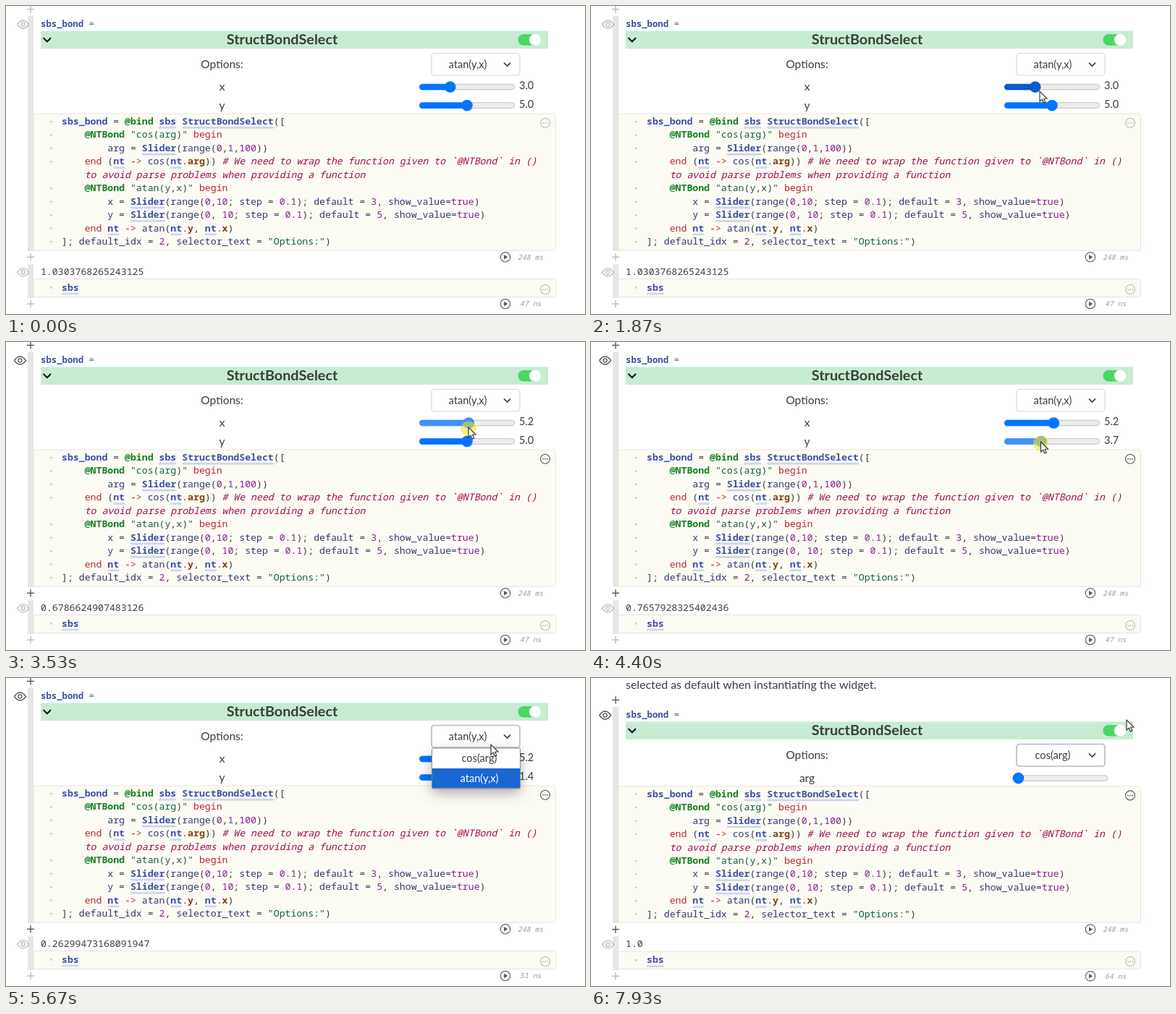
Write an HTML page with a canvas that moves like this. It is 800x426 px and loops after 8000 ms.

```html
<!DOCTYPE html>
<html lang="en">
<head>
<meta charset="utf-8">
<title>StructBondSelect</title>
<style>
html, body { margin: 0; width: 100%; height: 100%; overflow: hidden; background: #fff; }
canvas { display: block; width: 800px; height: 426px; }
</style>
</head>
<body>
<canvas id="stage" width="800" height="426"></canvas>
<script>
const ctx = document.getElementById('stage').getContext('2d');
const LOOP = 8000, LAG = 150;
const MONO = '"Noto Sans Mono", "DejaVu Sans Mono", monospace';
const SANS = 'Lato, "Open Sans", sans-serif';
const INK = '#3b3b44', BLUE = '#3d4ea6', NAVY = '#31396f';

const CODE = [
  'sbs_bond = @bind sbs StructBondSelect([',
  '    @NTBond "cos(arg)" begin',
  '        arg = Slider(range(0,1,100))',
  '    end (nt -> cos(nt.arg)) # We need to wrap the function given to `@NTBond` in ()',
  '    #to avoid parse problems when providing a function',
  '    @NTBond "atan(y,x)" begin',
  '        x = Slider(range(0,10; step = 0.1); default = 3, show_value=true)',
  '        y = Slider(range(0, 10; step = 0.1); default = 5, show_value=true)',
  '    end nt -> atan(nt.y, nt.x)',
  ']; default_idx = 2, selector_text = "Options:")'
];
const WRAPPED = 4;
const TOKEN = /#.*|"[^"]*"|@\w+|\.[a-z]\w*|\d+(\.\d+)?|\w+|->|[^\w\s]/g;
const LINKED = ['sbs', 'StructBondSelect', 'Slider', 'nt'];

// time, x, y of the pointer tip
const PATH = [
  [1330, 636, 146], [1600, 620, 118], [2300, 620, 118], [2850, 664, 118],
  [3000, 676, 118], [3090, 681, 118], [3500, 639, 118], [3680, 639, 118],
  [4080, 637, 138], [4250, 637, 138], [4400, 621.6, 138], [4750, 595, 138],
  [4960, 595, 138], [5330, 655, 80], [5460, 669, 91], [5670, 670, 92],
  [6270, 670, 93], [6450, 670, 103], [6600, 669, 100], [7130, 669, 100],
  [7650, 740, 58]
];
const PRESS = [[2250, 3540], [4150, 4900], [5460, 5560], [6540, 6620]];
const OPEN = [5520, 6600], SWITCH = 6740;

const within = (t, [a, b]) => t >= a && t < b;
const clamp = v => Math.max(0, Math.min(1, v));

function pointer(t) {
  if (t < PATH[0][0]) return null;
  for (let i = 1; i < PATH.length; i++) {
    const [t0, x0, y0] = PATH[i - 1], [t1, x1, y1] = PATH[i];
    if (t <= t1) {
      const k = (t - t0) / (t1 - t0);
      return { x: x0 + (x1 - x0) * k, y: y0 + (y1 - y0) * k };
    }
  }
  const [, x, y] = PATH[PATH.length - 1];
  return { x, y };
}

function dragged(t, span, start) {
  if (t < span[0]) return start;
  const p = pointer(Math.min(t, span[1] - 1));
  return Math.round((p.x - 579) / 1.16) / 10;
}
const xAt = t => t < 2300 ? 3 : dragged(t, PRESS[0], 3);
const yAt = t => dragged(t, PRESS[1], 5);

function text(s, x, y, font, color = INK, align = 'left') {
  ctx.font = font;
  ctx.fillStyle = color;
  ctx.textAlign = align;
  ctx.fillText(s, x, y);
}
const mono = (size, weight = 400, style = '') => `${style} ${weight} ${size}px ${MONO}`;
const sans = (size, weight = 400) => `${weight} ${size}px ${SANS}`;

function box(x, y, w, h, r, fill, stroke, width = 1) {
  ctx.beginPath();
  ctx.roundRect(x, y, w, h, r);
  if (fill) { ctx.fillStyle = fill; ctx.fill(); }
  if (stroke) { ctx.strokeStyle = stroke; ctx.lineWidth = width; ctx.stroke(); }
}

function disc(x, y, r, fill, stroke, width = 1) {
  box(x - r, y - r, 2 * r, 2 * r, r, fill, stroke, width);
}

function line(points, color, width) {
  ctx.beginPath();
  points.forEach(([x, y]) => ctx.lineTo(x, y));
  ctx.strokeStyle = color;
  ctx.lineWidth = width;
  ctx.stroke();
}

function gray(k) {
  const v = Math.round(186 - 100 * k);
  return `rgb(${v},${v},${v})`;
}

function plus(x, y, k) {
  line([[x - 5, y], [x + 5, y]], gray(k), 1.4);
  line([[x, y - 5], [x, y + 5]], gray(k), 1.4);
}

function eye(y, k) {
  const x = 23.5 - 4 * k, c = gray(k);
  ctx.beginPath();
  ctx.moveTo(x - 8, y);
  ctx.quadraticCurveTo(x, y - 11, x + 8, y);
  ctx.quadraticCurveTo(x, y + 11, x - 8, y);
  ctx.strokeStyle = c;
  ctx.lineWidth = 1.3;
  ctx.stroke();
  disc(x, y, 2.6, null, c, 1.3);
}

function menuDots(y, k) {
  disc(745, y, 6.5, null, gray(k), 1.1);
  [-3, 0, 3].forEach(d => disc(745 + d, y, 0.9, gray(k)));
}

function runInfo(y, label, x) {
  disc(690, y, 6.7, null, '#666', 1.2);
  ctx.beginPath();
  ctx.moveTo(688, y - 3.2);
  ctx.lineTo(693.2, y);
  ctx.lineTo(688, y + 3.2);
  ctx.fillStyle = '#555';
  ctx.fill();
  text(label, x, y + 3.2, mono(9.8, 400, 'italic'), '#999');
}

function style(tok) {
  if (tok[0] === '#') return ['#a00d50', 500, 'italic'];
  if (tok[0] === '"') return ['#125c40', 500];
  if (tok[0] === '@') return ['#12801a', 700];
  if (tok[0] === '.') return ['#7c4312', 600];
  if (/^(begin|end|->)$/.test(tok)) return ['#b8252c', 500];
  if (/^(\d|true)/.test(tok)) return ['#84208f', 500];
  if (tok === 'sbs_bond' || LINKED.includes(tok)) return [BLUE, 600];
  if (/^\w/.test(tok)) return [NAVY, 500];
  return [INK, 500];
}

function codeLine(src, x, base) {
  ctx.font = mono(13.2);
  const step = ctx.measureText('0').width;
  for (const m of src.matchAll(TOKEN)) {
    let tok = m[0], at = x + m.index * step;
    const [color, weight, slant] = style(tok);
    if (LINKED.includes(tok)) {
      ctx.fillStyle = '#cfd4ee';
      ctx.fillRect(at, base + 3, tok.length * step, 2.6);
    }
    if (tok[0] === '.' && tok.length > 1) {
      text('.', at, base, mono(13.2, 500), INK);
      tok = tok.slice(1);
      at += step;
    }
    if (tok.startsWith('#to')) tok = tok.slice(1);
    text(tok, at, base, mono(13.2, weight, slant), color);
  }
}

function slider(left, cy, frac, state, filled = true) {
  const color = { idle: '#0075ff', hover: '#0a5bc8', press: '#3c92fb' }[state];
  const thumb = left + 8 + frac * 116;
  box(left + 0.5, cy - 3.8, 131, 7.6, 3.8, '#ededee', '#c3c3c5');
  if (filled) box(left, cy - 4.2, thumb - left, 8.4, 4.2, color);
  disc(thumb, cy, 7.8, color);
}

function select(label, y, focus) {
  box(588, y, 122, 30.5, 4, '#fff', focus ? '#b9b9c3' : '#d8d9e0', focus ? 1.6 : 1.2);
  text(label, 638, y + 20.5, sans(14.6), INK, 'center');
  line([[688, y + 13], [692.5, y + 17.5], [697, y + 13]], '#333', 1.6);
}

function dropdown(p) {
  const onFirst = p.y > 98;
  ctx.save();
  ctx.shadowColor = 'rgba(0,0,0,.32)';
  ctx.shadowBlur = 18;
  ctx.shadowOffsetY = 6;
  box(588.5, 97, 122, 56, 2, '#fff');
  ctx.restore();
  ctx.fillStyle = '#1967d2';
  ctx.fillRect(589, onFirst ? 97.5 : 125, 121, 27.5);
  box(588.5, 97, 122, 56, 2, null, '#8a8a8a');
  text('cos(arg)', 654, 116, sans(14.6), onFirst ? '#fff' : INK, 'center');
  text('atan(y,x)', 654, 144, sans(14.6), onFirst ? INK : '#fff', 'center');
}

function arrow({ x, y }) {
  const shape = [[0, 0], [0, 14], [3.2, 11.2], [5.4, 16], [7.8, 15], [5.6, 10.3], [10, 10]];
  ctx.beginPath();
  shape.forEach(([dx, dy]) => ctx.lineTo(x + dx, y + dy));
  ctx.closePath();
  ctx.fillStyle = '#fff';
  ctx.fill();
  ctx.strokeStyle = '#2b2b2b';
  ctx.lineWidth = 1.1;
  ctx.stroke();
}

function widget(t, p, cos) {
  const dy = cos ? 26 : 0;
  text('sbs_bond', 48, 28.5 + dy, mono(12.3, 600), BLUE);
  text('=', 114.5, 28.5 + dy, mono(12.3, 500), '#666');
  ctx.fillStyle = '#c6ecd2';
  ctx.fillRect(48, 34.5 + dy, 701, 24.5);
  line([[51.5, 44 + dy], [56.8, 49.3 + dy], [62, 44 + dy]], '#111', 2);
  text('StructBondSelect', 381.5, 52.5 + dy, sans(19.8, 700), '#37403b', 'center');
  box(707.5, 39 + dy, 32, 15.5, 7.75, '#4cd663');
  disc(731.3, 46.7 + dy, 8.2, '#fff', '#dfeee3', 0.8);
  text('Options:', 298.5, 85.5 + dy, sans(15.5), INK, 'center');
  select(cos ? 'cos(arg)' : 'atan(y,x)', 65.5 + dy, t >= PRESS[2][0]);

  if (cos) {
    text('arg', 298.5, 143.5, sans(15.5), INK, 'center');
    slider(582.5, 138.6, 0, 'idle', false);
    return;
  }
  const rows = [['x', 112, xAt(t), PRESS[0]], ['y', 137.5, yAt(t), PRESS[1]]];
  const open = within(t, OPEN);
  rows.forEach(([name, cy, value, span]) => {
    const over = p && !open && Math.abs(p.y - cy) < 9 && p.x > 571 && p.x < 703;
    const state = within(t, span) ? 'press' : over ? 'hover' : 'idle';
    text(name, 298.5, cy + 5.3, sans(15.5), INK, 'center');
    slider(571, cy, value / 10, state);
    text(value.toFixed(1), 709, cy + 3, sans(14.5));
  });
}

function cell(top, bottom, codeTop, codeBottom) {
  ctx.fillStyle = '#e6e6e7';
  ctx.fillRect(30, top, 8, bottom - top);
  box(38, codeTop, 721.5, codeBottom - codeTop, [0, 4, 4, 0], '#fcfbf4', '#e9e6da');
}

function result(t) {
  const past = t - LAG;
  if (past >= SWITCH) return '1.0';
  return String(Math.atan2(yAt(past), xAt(past)));
}

function duration(t) {
  if (t < 2450) return 47;
  if (t < 3400) return 46;
  if (t < 4500) return 47;
  return t < SWITCH + LAG ? 51 : 64;
}

function draw(t) {
  const p = pointer(t), cos = t >= SWITCH;
  const dy = cos ? 26 : 0, low = cos ? 0.7 : 0;
  const lit = clamp((t - 2220) / 250);

  ctx.fillStyle = '#fff';
  ctx.fillRect(0, 0, 800, 426);
  if (cos) text('selected as default when instantiating the widget.', 48, 15, sans(15.95));

  cell(14 + dy, 339, 149 + low, 338.3);
  plus(34, 4.5 + dy, lit);
  eye(25.5 + dy, lit);
  widget(t, p, cos);
  CODE.forEach((src, i) => {
    const base = 164 + low + i * 18.45;
    if (i !== WRAPPED) disc(62.5, base - 4, 1.2, '#c3c0b4');
    codeLine(src, 77, base);
  });
  menuDots(161.7 + low, lit);
  runInfo(347.3 + low / 2, '248 ms', 707);
  plus(34, 347.3 + low / 2, lit);

  cell(357.5, 404, 377.5 + low, 402.5);
  eye(368.3 + low / 2, 0);
  text(result(t), 48, 371.5, mono(13.2), INK);
  disc(62.5, 389.5 + low, 1.2, '#c3c0b4');
  codeLine('sbs', 77, 393.7 + low);
  menuDots(392, 0);
  runInfo(412 + low / 2, duration(t) + ' ns', 710);
  plus(34, 412 + low / 2, 0);

  if (within(t, OPEN)) dropdown(p);
  if (p) {
    if (PRESS.some(span => within(t, span))) disc(p.x, p.y + 2, 10.5, 'rgba(240,226,32,.58)');
    arrow(p);
  }
}

const start = performance.now();
function tick() {
  draw((performance.now() - start) % LOOP);
  requestAnimationFrame(tick);
}
tick();
</script>
</body>
</html>
```
